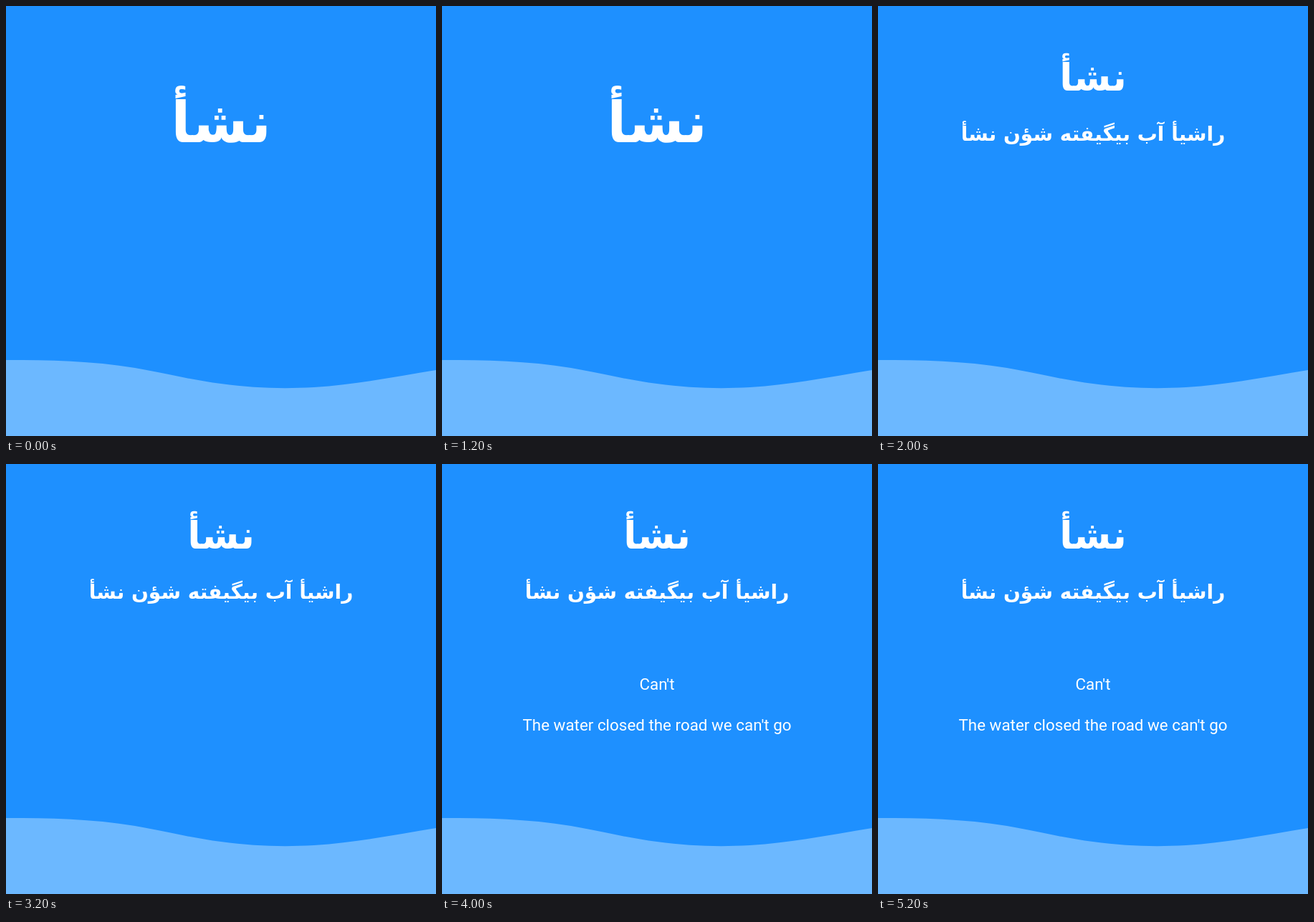
Recreate the animation shown at these times as an HTML page. Size 600 by 600 pixels, loop 6000 ms.

```html
<!DOCTYPE html>
<html lang="en">
<head>
<meta charset="utf-8">
<title>Word card</title>
<style>
  html, body { margin: 0; width: 100%; height: 100%; overflow: hidden; background: #1e90ff; }
  svg { display: block; width: 100vw; height: 100vh; }
  text { fill: #fff; text-anchor: middle; }
  .fa { font-family: "DejaVu Sans", sans-serif; font-weight: 700; direction: rtl; }
  .en { font: 22.4px Roboto, sans-serif; }
  .big { font-size: 79px; }
  .title { font-size: 53px; }
  .phrase { font-size: 28px; }

  .word, .sentence, .meaning { animation: 6s step-end infinite; }
  .word { animation-name: word; }
  .sentence { animation-name: sentence; }
  .meaning { animation-name: meaning; }
  @keyframes word { 0% { opacity: 1; } 33.3333%, 100% { opacity: 0; } }
  @keyframes sentence { 0% { opacity: 0; } 33.3333%, 100% { opacity: 1; } }
  @keyframes meaning { 0% { opacity: 0; } 66.6667%, 100% { opacity: 1; } }
</style>
</head>
<body>
<svg viewBox="0 0 600 600">
  <rect width="600" height="600" fill="#1e90ff"/>
  <path fill="#6cb8ff" d="M0 494C60 494 120 495 180 505C225 513 260 522 300 527C345 533 385 534.5 430 532C490 528 545 517 600 508V600H0Z"/>
  <g class="word">
    <text class="fa big" x="300" y="190">نشأ</text>
  </g>
  <g class="sentence">
    <text class="fa title" x="300" y="118">نشأ</text>
    <text class="fa phrase" x="300" y="188">راشیأ آب بیگیفته شؤن نشأ</text>
  </g>
  <g class="meaning">
    <text class="en" x="300" y="315">Can't</text>
    <text class="en" x="300" y="372">The water closed the road we can't go</text>
  </g>
</svg>
</body>
</html>
```
